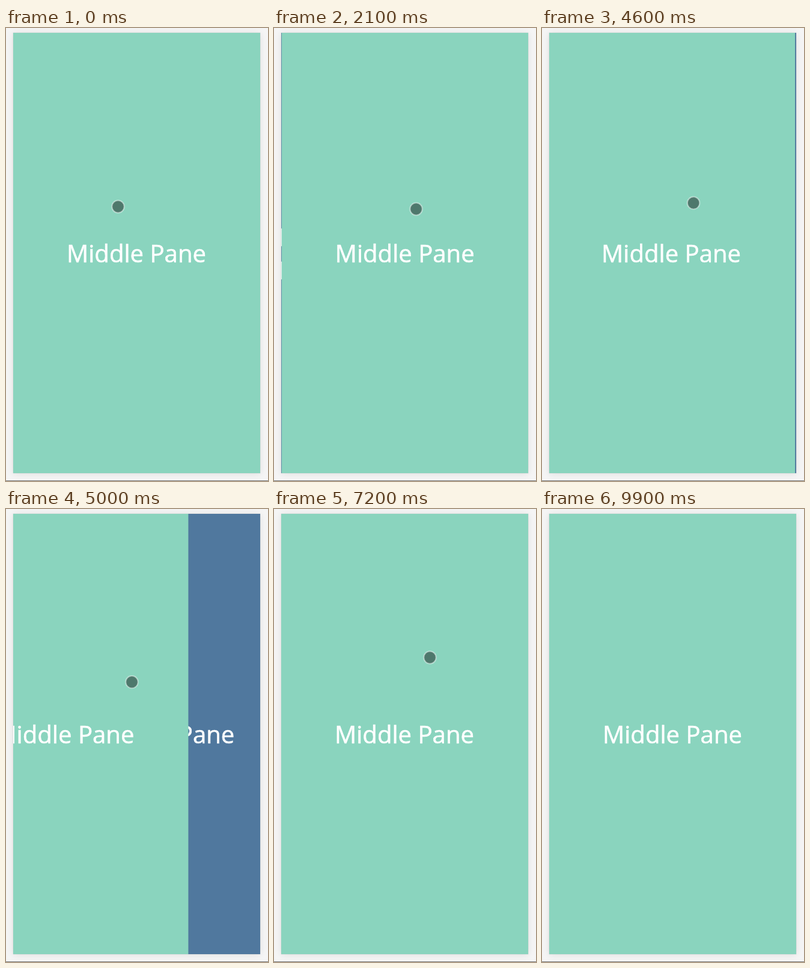
An HTML page that plays this animation: 436 px wide and 752 px high, repeating every 10000 ms.

```html
<!DOCTYPE html>
<html lang="en">
<head>
<meta charset="utf-8">
<title>Sliding panes</title>
<style>
  html, body { margin: 0; width: 100%; height: 100%; overflow: hidden; background: #f5f5f5; }
  .card { position: absolute; left: 12px; top: 8px; width: 411px; height: 731px; box-shadow: 0 0 1px rgba(0,0,0,.25), 0 1px 12px rgba(0,0,0,.09); }
  svg { position: absolute; left: 0; top: 0; display: block; }
  text { font: 40.1px "Open Sans", sans-serif; fill: #fff; stroke: #fff; stroke-width: .6px; }
  .mid { text-anchor: middle; }
  .side { fill: #50789e; }
  .main { fill: #8ad4be; }
</style>
</head>
<body>
<div class="card"></div>
<svg width="436" height="752" viewBox="0 0 436 752">
  <clipPath id="frame"><rect x="12" y="8" width="411" height="731"/></clipPath>
  <g clip-path="url(#frame)">
    <rect class="side" x="12" y="8" width="411" height="731"/>
    <g id="left">
      <text x="6" y="361.5">Left</text>
      <text x="6" y="416.5">Pane</text>
    </g>
    <text id="right" class="mid" x="280.5" y="389">Right Pane</text>
    <g id="middle">
      <rect class="main" x="12" y="8" width="411" height="731"/>
      <text class="mid" x="217" y="389">Middle Pane</text>
    </g>
    <rect id="edge" x="12" y="8" width="2" height="731" fill="#f8f8f8"/>
  </g>
  <circle id="dot" r="10.2" fill="#000" fill-opacity=".43" stroke="#fff" stroke-opacity=".45" stroke-width="2"/>
  <rect y="751" width="436" height="1" fill="#777"/>
</svg>
<script>
  const LOOP = 10000, STEP = 100, EXIT = 9900;
  const LEFT = 82, RIGHT = -288;
  const $ = id => document.getElementById(id);
  const left = $('left'), right = $('right'), middle = $('middle'), edge = $('edge'), dot = $('dot');

  // Each move eases the pointer and the pane to a new rest: start, end, x, y, pane
  const moves = [
    [300, 400, 300, 298, LEFT],
    [1200, 2200, 236, 300.5, 0],
    [2500, 3300, 343.5, 297.5, LEFT],
    [3600, 4400, 252.8, 290.5, 0],
    [4500, 5600, 148.5, 282.5, RIGHT],
    [5765, 6400, 148.5, 282.5, 0],
    [7100, 7200, 259.5, 246.5, 0],
    [7200, 7500, 380, 615, 0],
    [7700, 8100, 288, 568, 0],
    [8800, 9000, 284, 539, 0],
    [9200, 9500, 300, 724, 0],
    [9500, 9900, 377, 37, 0]
  ];

  function ease(u) {
    u = Math.min(1, Math.max(0, u));
    return u * u * u * (u * (6 * u - 15) + 10);
  }

  function poseAt(t) {
    let pose = [186.5, 296.5, 0];
    for (const [start, end, ...goal] of moves) {
      const k = ease((t - start) / (end - start));
      pose = pose.map((v, i) => v + (goal[i] - v) * k);
    }
    return pose;
  }

  const show = (el, on) => { el.style.display = on ? '' : 'none'; };

  function draw(now) {
    const t = Math.floor((now % LOOP) / STEP) * STEP;
    const [x, y, shift] = poseAt(t);
    middle.setAttribute('transform', `translate(${shift})`);
    dot.setAttribute('cx', x);
    dot.setAttribute('cy', y);
    show(left, shift > 0);
    show(right, shift < 0);
    show(edge, shift < -200);
    show(dot, t < EXIT);
  }

  const begin = performance.now();
  function tick() {
    draw(performance.now() - begin);
    requestAnimationFrame(tick);
  }
  tick();
</script>
</body>
</html>
```
